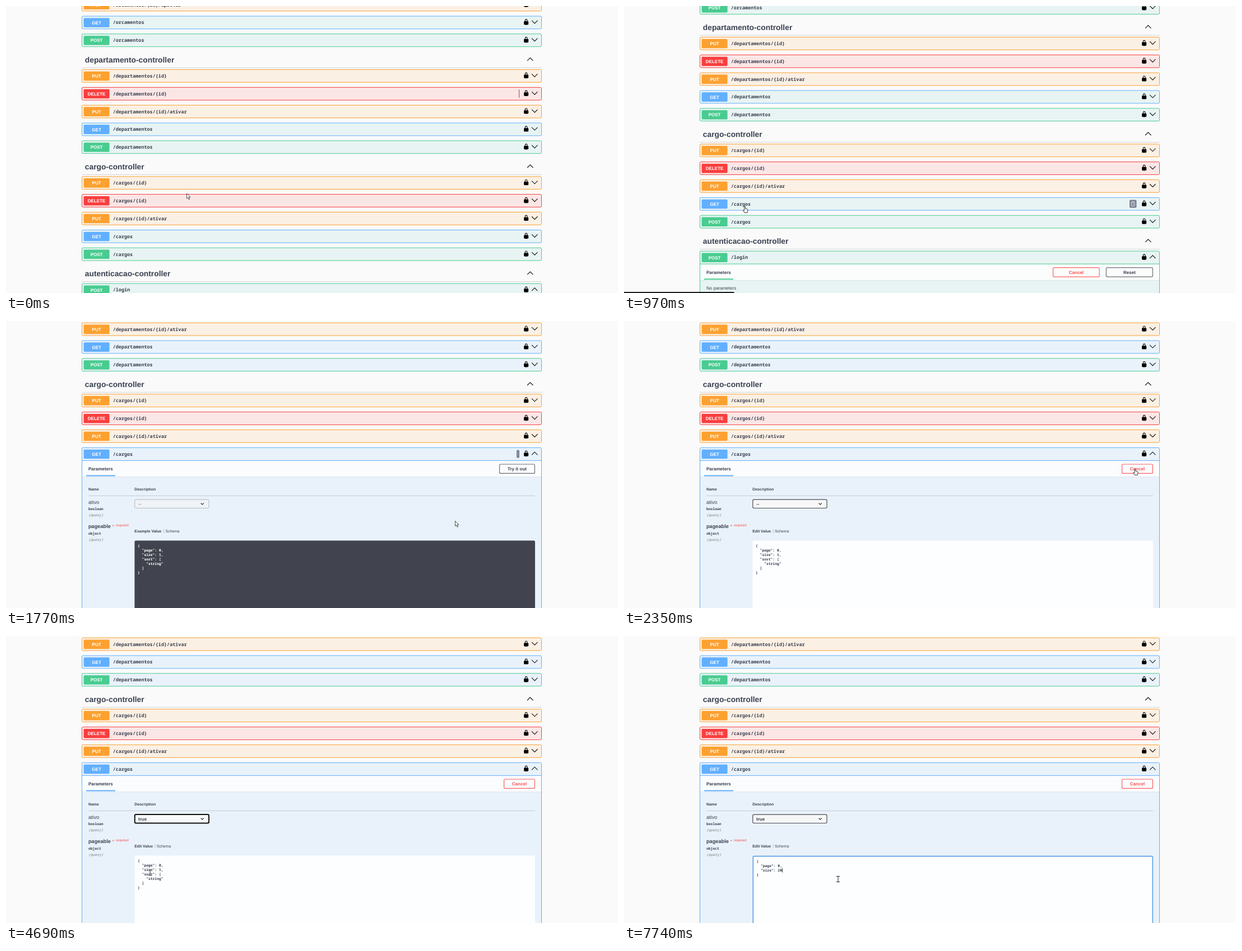
Write an HTML page that moves like this. It is 1092 by 513 pixels and loops after 8000 ms.

```html
<!DOCTYPE html>
<html lang="pt">
<head>
<meta charset="utf-8">
<title>API docs</title>
<style>
html, body { margin: 0; width: 100%; height: 100%; overflow: hidden; background: #fafafa; }
svg { display: block; width: 1092px; height: 513px; }
text { font: 700 8.05px "Liberation Sans", Arial, sans-serif; fill: #3b4151; white-space: pre; text-rendering: geometricPrecision; }
.title { font-size: 13.8px; }
.small { font-size: 6.9px; }
.big { font-size: 9.2px; }
.plain { font-weight: 400; }
.mid { text-anchor: middle; }
.path { font: 700 8.46px "Noto Sans Mono", monospace; }
.code { font: 600 6.33px "Noto Sans Mono", monospace; }
.type { font: 700 6.33px "Noto Sans Mono", monospace; }
.query { font: italic 400 6.33px "Noto Sans Mono", monospace; fill: #777; }
.white { fill: #fff; }
.red { fill: #ff5050; }
.arrow { fill: none; stroke: #111; stroke-width: 1.1; }
.GET, .POST { fill: #e8f4f3; }
.open .GET, .open .POST { fill: #e9f2fa; }
.PUT { fill: #fbf0e4; }
.DELETE { fill: #fbe6e6; }
</style>
</head>
<body>
<svg id="stage" viewBox="0 0 1092 513"></svg>
<script>
const COLORS = { GET: '#61affe', POST: '#49cc90', PUT: '#fca130', DELETE: '#f93e3e' };
const PITCH = 31.82, CHAR = 3.8, LINE = 7.95;
const GET_Y = 411.8, LOGIN_Y = 507.5;

const text = (x, y, s, cls = '') => `<text x="${x}" y="${y}" class="${cls}">${s}</text>`;
const rect = (x, y, w, h, attrs) => `<rect x="${x}" y="${y}" width="${w}" height="${h}" ${attrs}/>`;
const line = (x1, y1, x2, y2, color, w = 1) =>
  `<path d="M${x1} ${y1}L${x2} ${y2}" stroke="${color}" stroke-width="${w}"/>`;
const group = (id, body) => `<g id="${id}">${body}</g>`;
const chevron = (x, y, up, id = '') => {
  const d = up ? -2.6 : 2.6;
  return `<path ${id && `id="${id}"`} class="arrow" d="M${x - 5.2} ${y - d}L${x} ${y + d}L${x + 5.2} ${y - d}"/>`;
};
const lock = c => `<path transform="translate(922.4 ${c - 6.8}) scale(.575)" fill-rule="evenodd"
  d="M15.8 8H14V5.6C14 2.7 12.7 1 10 1S6 2.7 6 5.6V8H4Q3 8 3 9.2V17Q3 18 4 18.3Q6 19 7.1 19H12.9Q14 19 16 18.3Q17 18 17 17V9.2Q17 8 15.8 8ZM12 8H8V5.2C8 3.8 8.8 3 10 3S12 3.8 12 5.2Z"/>`;

function row(c, method, path, open = false, chev = chevron(943.3, c - 1, open)) {
  const color = COLORS[method];
  return rect(135.5, c - 11.4, 820, open ? 600 : 22.8, `rx="2" class="${method}" stroke="${color}"`) +
    rect(138.6, c - 8.1, 46, 16.6, `rx="1.7" fill="${color}"`) +
    text(161.6, c + 3.1, method, 'white mid') + text(190.7, c + 2.9, path, 'path') +
    lock(c) + chev;
}

function section(y, name, rows) {
  return text(140.8, y + 4.8, name, 'title') + chevron(935.3, y - .6, true) +
    line(135, y + 14.4, 956, y + 14.4, '#d3d5d9') +
    rows.map(([method, path], i) => row(y + 29.2 + i * PITCH, method, path)).join('');
}

function button(x, y, w, label, red) {
  return rect(x, y, w, 16.4, `rx="2" fill="none" stroke-width="1.2" stroke="${red ? '#ff6060' : '#6b6e76'}"`) +
    text(x + w / 2, y + 11.2, label, 'mid' + (red ? ' red' : ''));
}

function panelHead(c, color) {
  return rect(136, c + 11.6, 819, 29, 'fill="#fff" fill-opacity=".8"') +
    line(136, c + 11.6, 955, c + 11.6, color) +
    line(136, c + 41, 955, c + 41, 'rgba(0,0,0,.07)') +
    text(147, c + 29.4, 'Parameters') + line(143, c + 38.8, 195, c + 38.8, color, 2);
}

function tabs(y, first, gap) {
  return text(229.2, y, first, 'small') + line(gap, y - 6.5, gap, y + 1, '#aaa', .7) +
    text(gap + 3, y, 'Schema', 'small plain');
}

const SOURCE = ['{', '  "page": 0,', '  "size": 1,', '  "sort": [', '    "string"', '  ]', '}'];

// Lines of code; sel = [line, col, endLine, endCol]
function code(x, y, lines, cls, sel) {
  return lines.map((s, i) => {
    const base = y + i * LINE;
    if (!sel || i < sel[0] || i > sel[2]) return text(x, base, s, cls);
    const from = i === sel[0] ? sel[1] : 0;
    const to = i === sel[2] ? sel[3] : s.length;
    const w = (to - from + (i < sel[2] ? .9 : 0)) * CHAR;
    return rect(x + from * CHAR, base - 6.2, Math.max(0, w), 8, 'fill="#2f62cf"') +
      text(x, base, `${s.slice(0, from)}<tspan fill="#fff">${s.slice(from, to)}</tspan>${s.slice(to)}`, cls);
  }).join('');
}

const crud = name => [['PUT', `/${name}/{id}`], ['DELETE', `/${name}/{id}`],
  ['PUT', `/${name}/{id}/ativar`], ['GET', `/${name}`], ['POST', `/${name}`]];

function loginBlock() {
  const c = LOGIN_Y;
  return row(c, 'POST', '/login', true) + panelHead(c, COLORS.POST) +
    button(765.6, c + 18.2, 82.6, 'Cancel', true) + button(860.4, c + 18.2, 83, 'Reset') +
    text(147, c + 57, 'No parameters', 'plain');
}

// Drawn with the row centre at y = 0
function getPanel() {
  return panelHead(0, COLORS.GET) +
    text(147, 65.4, 'Name', 'small') + text(229.2, 65.4, 'Description', 'small') +
    line(147, 74.6, 944, 74.6, '#c3cad3') +
    text(147, 88.9, 'ativo', 'big plain') + text(147, 100.4, 'boolean', 'type') +
    text(147, 111.3, '(query)', 'query') +
    text(147, 132.6, 'pageable', 'big') + text(190, 131.4, '*', 'small red') +
    `<text x="196" y="129.2" class="plain red" style="font-size:6.2px">required</text>` +
    text(147, 144.4, 'object', 'type') + text(147, 155.3, '(query)', 'query') +
    group('view', button(880.6, 18.2, 62.8, 'Try it out') + tabs(140.4, 'Example Value', 281.4) +
      rect(229.4, 154.8, 714.6, 300, 'rx="2.2" fill="#41444e"') +
      code(235, 166.4, SOURCE, 'code white')) +
    group('edit', button(888.6, 18.2, 54.8, 'Cancel', true) + tabs(140.4, 'Edit Value', 266) +
      group('area', '')) +
    group('select', '');
}

function selectBox(mode, value) {
  const look = { off: ['#eff3f7', '#b4b8be', 1], focus: ['#f7f9fa', '#111', 2], on: ['#f7f7f7', '#4a4d56', 1.2] }[mode];
  return rect(229.8, 81.3, 132.2, 15.4, `rx="2.2" fill="${look[0]}" stroke="${look[1]}" stroke-width="${look[2]}"`) +
    `<text x="236" y="91.9" ${mode === 'off' ? 'fill-opacity=".55"' : ''}>${value}</text>` +
    `<path class="arrow" d="M347.6 87.9L350.2 90.3L352.8 87.9"/>`;
}

function dropdown(active) {
  return rect(229.6, 97, 132.4, 42.3, 'fill="#f7f7f7" stroke="#777"') +
    rect(230.1, 97.3 + active * 14, 131.4, 14, 'fill="#1967d2"') +
    ['--', 'true', 'false'].map((s, i) =>
      text(236, 107.4 + i * 14, s, 'plain' + (i === active ? ' white' : ''))).join('');
}

const POINTERS = {
  arrow: '<path d="M0 0V9.2L2.1 7.3L3.7 10.9L5.2 10.2L3.6 6.7H6.4Z" fill="#fff" stroke="#222" stroke-width=".8"/>',
  hand: '<path d="M-1 1Q0-.7 1 1V4.3L4 5.1Q5.3 5.5 5.1 6.8L4.3 11.4H-.6L-3 8Q-3.7 6.5-2.3 6.8L-1 7.6Z" fill="#fff" stroke="#222" stroke-width=".9"/>',
  beam: ['#fff" stroke-width="2.2', '#222" stroke-width="1'].map(s =>
    `<path d="M-3-5H3M0-5V5M-3 5H3" fill="none" stroke="${s}"/>`).join('')
};

const stage = document.getElementById('stage');
stage.innerHTML = group('page',
  row(-2.4, 'PUT', '/orcamentos/{id}/aprovar') + row(29.5, 'GET', '/orcamentos') +
  row(61.3, 'POST', '/orcamentos') +
  section(95.8, 'departamento-controller', crud('departamentos')) +
  section(287, 'cargo-controller', crud('cargos').slice(0, 3)) +
  group('closed', row(GET_Y, 'GET', '/cargos') + row(GET_Y + PITCH, 'POST', '/cargos') +
    section(478.2, 'autenticacao-controller', []) + loginBlock()) +
  group('opened', row(GET_Y, 'GET', '/cargos', true) +
    `<g transform="translate(0 ${GET_Y})">${getPanel()}</g>`) +
  group('copy', '') + group('trace', line(915.6, 149.3, 915.6, 164, '#a5616c', 1.2))) +
  rect(-4, 511, 201, 6, 'id="status" rx="2"') + group('pointer', '');
const el = id => document.getElementById(id);
const show = (id, on) => { el(id).style.display = on ? '' : 'none'; };

// [first, last, count] of evenly spaced picture changes
const RUNS = [[150, 970, 7], [1100, 1230, 2], [1380, 1530, 2], [1650, 1770, 2], [1920, 2220, 3],
  [2350, 3350, 8], [3500, 4540, 8], [4690, 5700, 8], [5820, 6280, 4], [7590, 7740, 2]];
const STEPS = [0, ...RUNS.flatMap(([a, b, n]) =>
  Array.from({ length: n }, (_, i) => Math.floor(a + (b - a) * i / (n - 1))))];

const SCROLL = [[0, 0], [150, 48], [280, 58], [1530, 62.5], [1650, 135], [1770, 174]];
const COPY = [[0, 0], [690, 6], [960, 12.5], [1100, 14], [1650, 9], [1770, 5], [1920, 0]];
const POINTER = [[0, 'arrow'], [690, 'hand'], [1650, 'arrow'], [2070, 'hand'], [2630, 'arrow'], [4380, 'beam']];
const MOVE = [[0, 322.5, 335], [280, 322, 336], [830, 218, 354], [970, 215.8, 358], [1380, 216, 358],
  [1530, 489, 357], [1770, 801.5, 357.5], [2220, 912, 264], [2490, 912, 264], [3200, 288, 328],
  [3350, 288, 328], [3500, 287.5, 336.3], [3790, 287, 353], [3940, 287, 353], [4540, 262, 412],
  [4970, 248, 443], [5120, 248, 443], [5700, 275, 419], [6280, 382, 434.5]];

const last = (keys, t) => keys.findLast(k => k[0] <= t);
const hold = (keys, t) => last(keys, t)[1];
function glide(t) {
  const a = last(MOVE, t), b = MOVE[MOVE.indexOf(a) + 1];
  if (!b) return a.slice(1);
  const p = (t - a[0]) / (b[0] - a[0]);
  return [a[1] + (b[1] - a[1]) * p, a[2] + (b[2] - a[2]) * p];
}

function areaBody(t) {
  const focus = t >= 4960;
  const box = rect(focus ? 230.3 : 229.4, focus ? 155.8 : 154.8, focus ? 713 : 714.6, 300,
    'rx="2" fill="#fcfeff"' + (focus ? ' stroke="#5b9fe6" stroke-width="1.6"' : ''));
  if (!focus) return box + code(235, 166.4, SOURCE, 'code');
  if (t >= 7590) {
    const size = '  "size": ' + (t >= 7740 ? '20' : '2');
    const x = 236.6 + size.length * CHAR + .4;
    return box + code(236.4, 167.4, ['{', '  "page": 0,', size, '}'], 'code') +
      line(x, 177.2, x, 185, '#111', .8);
  }
  const [x, y] = glide(Math.min(t, 5700));
  const ln = Math.min(5, Math.round((y - 403.4) / LINE));
  const col = Math.min(SOURCE[ln].length, Math.round((x - 236.6) / CHAR));
  return box + code(236.4, 167.4, SOURCE, 'code', [ln, col, 5, 3]);
}

function copyBody(w) {
  if (!w) return '';
  const x = 914.2 + (14 - w) * .2 - w, y = GET_Y - 7.2, m = x + w / 2;
  const mark = w > 8
    ? `<path d="M${m - 3} ${y + 3.6}H${m + 2.6}V${y + 7}M${m - 3} ${y + 3.6}V${y + 11}H${m + 2.6}V${y + 9.4}M${m + 4} ${y + 8.2}H${m - .6}M${m - 1.8} ${y + 5.6}H${m + 1.2}M${m - 1} ${y + 2.8}H${m + 1}" fill="none" stroke="#e4e6ea" stroke-width=".9"/>`
    : line(m, y + 4, m, y + 10, '#a9adb8', 1);
  return rect(x, y, w, 14.2, 'rx="2" fill="#7d8293"') + mark;
}

function draw(t) {
  const open = t >= 1380, edit = t >= 2350;
  stage.setAttribute('class', open ? 'open' : '');
  el('page').setAttribute('transform', `translate(0 ${-hold(SCROLL, t)})`);
  show('closed', !open);
  show('opened', open);
  show('view', !edit);
  show('edit', edit);
  show('trace', t < 150);
  el('copy').innerHTML = copyBody(hold(COPY, t));
  el('area').innerHTML = areaBody(t);

  const mode = !edit ? 'off' : t >= 3350 && t < 4960 ? 'focus' : 'on';
  const list = t >= 3350 && t < 3940;
  el('select').innerHTML = selectBox(mode, t >= 3940 ? 'true' : '--') +
    (list ? dropdown(t >= 3780 ? 1 : 0) : '');

  show('status', t >= 830 && t < 1650);
  el('status').setAttribute('fill', t < 1530 ? '#1c1c1c' : '#a3a3a3');
  el('pointer').innerHTML = POINTERS[hold(POINTER, t)];
  el('pointer').setAttribute('transform', `translate(${glide(t).join(' ')})`);
}

let shown = -1;
function tick() {
  const now = performance.now() % 8000;
  const step = STEPS.findLast(s => s <= now);
  if (step !== shown) draw(shown = step);
  requestAnimationFrame(tick);
}
tick();
</script>
</body>
</html>
```
